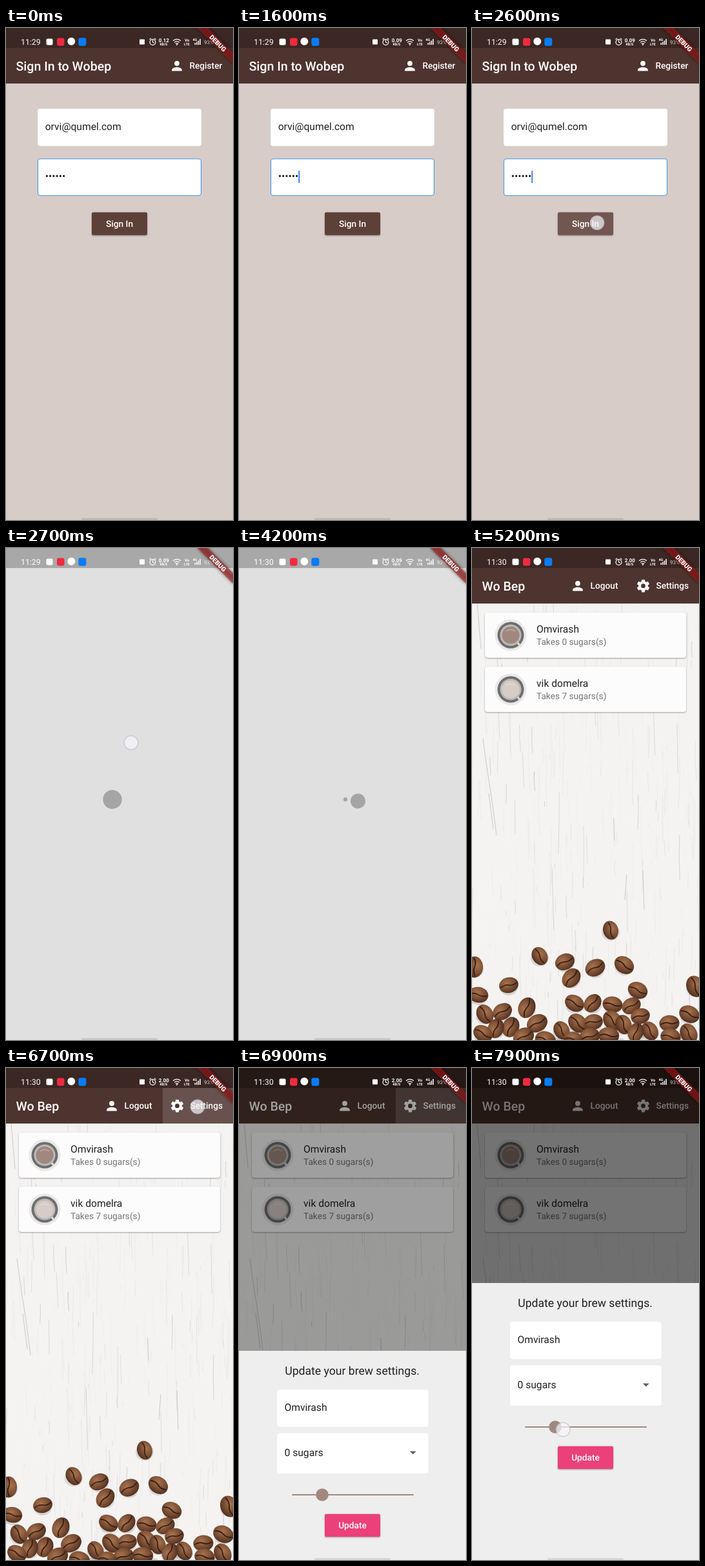
Write an HTML page that moves like this. It is 352 by 762 pixels and loops after 8000 ms.

```html
<!DOCTYPE html>
<html lang="en">
<head>
<meta charset="utf-8">
<title>Brew settings</title>
<style>
  html, body { margin: 0; width: 100%; height: 100%; overflow: hidden; background: #d7ccc8; }
  svg { display: block; width: 100%; height: 100%; }
  text {
    font-family: Roboto, "Open Sans", sans-serif; font-size: 15.65px; fill: #212121;
    text-rendering: geometricPrecision;
  }
  .title { font-size: 19.56px; font-weight: 500; fill: #fff; }
  .label { font-size: 13.7px; font-weight: 500; fill: #fff; }
  .sub { font-size: 13.7px; fill: #757575; }
  .mid { text-anchor: middle; }
  .raised { filter: drop-shadow(0 1px 1px rgba(0, 0, 0, .35)); }
  #status text { fill: #fff; }
</style>
</head>
<body>
<svg id="stage" viewBox="0 0 352 762" preserveAspectRatio="none"></svg>
<script>
const LOOP = 8000;
const LOADING = 2660, HOME = 4300, SHEET = 6801;
const SHEET_TOP = 333, HEIGHT = 762;

const rect = (x, y, w, h, fill, r = 0, extra = '') =>
  `<rect x="${x}" y="${y}" width="${w}" height="${h}" rx="${r}" fill="${fill}" ${extra}/>`;
const disc = (x, y, r, fill, extra = '') =>
  `<circle cx="${x}" cy="${y}" r="${r}" fill="${fill}" ${extra}/>`;
const text = (x, y, s, cls = '', extra = '') =>
  `<text x="${x}" y="${y}" class="${cls}" ${extra}>${s}</text>`;
const group = (id, ...parts) => `<g id="${id}">${parts.join('')}</g>`;
const tiny = (x, y, s, size, weight = 700, extra = '') =>
  text(x, y, s, '', `style="font-size:${size}px;font-weight:${weight}" ${extra}`);

function random(seed) {
  return () => (seed = (seed * 16807) % 2147483647) / 2147483647;
}

// CSS-style cubic curve, solved by bisection
function bezier(x1, y1, x2, y2) {
  const at = (a, b, s) => 3 * a * s * (1 - s) ** 2 + 3 * b * s * s * (1 - s) + s ** 3;
  return x => {
    if (x <= 0) return 0;
    if (x >= 1) return 1;
    let lo = 0, hi = 1;
    for (let i = 0; i < 24; i++) {
      const m = (lo + hi) / 2;
      if (at(x1, x2, m) < x) lo = m; else hi = m;
    }
    return at(y1, y2, lo);
  };
}
const easeInOut = bezier(.42, 0, .58, 1);
const ease = bezier(.25, .1, .25, 1);
const decelerate = bezier(0, 0, .2, 1);

const bar = title => rect(0, 0, 352, 86, '#4e342e') + text(15.5, 66, title, 'title');
const person = x =>
  `<path transform="translate(${x - 11.75} 47) scale(.98)" fill="#fff"
    d="M12 12a4 4 0 1 0 0-8 4 4 0 0 0 0 8zm0 2c-2.7 0-8 1.3-8 4v2h16v-2c0-2.7-5.3-4-8-4z"/>`;

function gear(x, y) {
  const teeth = [0, 60, 120].map(a =>
    rect(-2.6, -9.8, 5.2, 19.6, '#fff', 1, `transform="rotate(${a})"`)).join('');
  return `<g transform="translate(${x} ${y})">${teeth}
    <circle r="5.4" fill="none" stroke="#fff" stroke-width="4"/>${disc(0, 0, 3.4, '#4e342e')}</g>`;
}

const button = (y, fill, label) =>
  rect(133, y, 86, 35.2, fill, 2, 'class="raised"') + text(176, y + 22.2, label, 'label mid');

function signIn() {
  return group('signIn',
    rect(0, 0, 352, HEIGHT, '#d7ccc8'),
    bar('Sign In to Wobep'), person(265), text(284.4, 63.4, 'Register', 'label'),
    rect(49, 125, 254, 57.7, '#fff', 4), text(60.7, 158, 'orvi@qumel.com'),
    rect(49.5, 202.8, 253, 56.7, '#fff', 4, 'stroke="#4a9ae0" stroke-width="1.1"'),
    text(60.7, 235, '••••••'),
    rect(92.2, 221, 2, 19, '#4285f4', 0, 'id="cursor"'),
    button(285.5, '#5d4037', 'Sign In'),
    rect(133, 285.5, 86, 35.2, '#fff', 2, 'id="press" opacity="0"'));
}

function wood() {
  const rnd = random(4711);
  let out = rect(0, 86, 352, 676, '#f4f3f2');
  for (let i = 0; i < 600; i++) {
    const x = rnd() * 352, y = 70 + rnd() * 660, len = 8 + rnd() ** 2 * 90;
    const lean = (rnd() - .4) * len * .08, alpha = .04 + rnd() ** 4 * .2;
    const color = i % 3 ? '#77716d' : '#fff';
    out += `<path d="M${x.toFixed(1)} ${y.toFixed(1)}q${(rnd() * 3 - 1.5).toFixed(1)} ${(len / 2).toFixed(1)} ${lean.toFixed(1)} ${len.toFixed(1)}"
      stroke="${color}" stroke-width="${(.5 + rnd()).toFixed(1)}" opacity="${alpha.toFixed(2)}"/>`;
  }
  const cracks = 'M17 295q5 40 10 70t11 80M26 380l7 55M240 505l-3 40M265 500l2 60M8 86l6 70';
  return `<g fill="none">${out}<path d="${cracks}" stroke="#6d6865" opacity=".3"/></g>`;
}

// x, y, tilt
const BEANS = [
  215, 592, 75, 105, 632, 60, 4, 649, 90, 144, 641, -25, 154, 666, -50, 191, 650, -30,
  236, 646, 35, 57, 677, -15, 10, 692, 10, 257, 685, 25, 346, 679, 70, 159, 705, 30,
  187, 705, -50, 218, 707, 10, 247, 709, -30, 20, 722, 60, 47, 718, -30, 85, 712, -70,
  101, 736, -30, 60, 742, -65, 37, 744, -70, 218, 732, 50, 235, 738, 70, 261, 725, -15,
  164, 736, 45, 188, 734, -10, 139, 747, 60, 337, 722, 25, 276, 748, 60, 306, 736, -5,
  254, 750, -70, 17, 752, 30, 80, 757, -30, 212, 755, 5, 182, 757, -20, 308, 757, 10,
  336, 752, 60, 114, 762, 20, 157, 761, 10
];

function beans() {
  const rnd = random(99);
  let out = '';
  for (let i = 0; i < BEANS.length; i += 3) {
    const [x, y, tilt] = BEANS.slice(i, i + 3);
    const size = (.93 + rnd() * .14).toFixed(2);
    out += `<ellipse cx="${x}" cy="${y + 3}" rx="14" ry="13" fill="#3b2a20" opacity=".15"/>
      <use href="#bean" transform="translate(${x} ${y}) rotate(${tilt}) scale(${size})"/>`;
  }
  return out;
}

function card(y, name, sugars, tone) {
  const cy = y + 35;
  return rect(20, y, 312, 70, '#fcfcfc', 4, 'class="raised"')
    + disc(60, cy, 24.5, '#ebe8e7') + disc(60, cy, 20.5, '#6c6f70')
    + `<path d="M71 ${cy + 12}l3 4" stroke="#e0dddc" stroke-width="3" stroke-linecap="round"/>`
    + disc(60, cy, 16.5, '#bdbbba') + disc(60, cy, 13.6, tone)
    + `<path d="M53 ${cy - 6}q7 -5 14 0" stroke="#fff" opacity=".5" fill="none"/>`
    + text(100, y + 31.2, name) + text(100, y + 50.2, `Takes ${sugars} sugars(s)`, 'sub');
}

function home() {
  return group('home',
    wood(), beans(), bar('Wo Bep'),
    rect(243, 31, 109, 55, '#fff', 0, 'id="ink" opacity="0"'),
    person(164), text(183.6, 63.4, 'Logout', 'label'),
    gear(265.5, 58.7), text(285.4, 63.4, 'Settings', 'label'),
    card(100, 'Omvirash', 0, '#a1887f'), card(184, 'vik domelra', 7, '#d7ccc8'));
}

function loading() {
  return group('loading',
    rect(0, 0, 352, HEIGHT, '#e0e0e0'),
    `<g id="spin">${disc(-9.8, -9.8, 0, '#a5a5a5', 'id="dotA"')}${disc(-9.8, 9.8, 0, '#a5a5a5', 'id="dotB"')}</g>`);
}

function sheet() {
  return group('sheet',
    rect(0, 0, 352, 430, '#eee'),
    text(175.6, 37, 'Update your brew settings.', 'mid', 'style="font-size:17.6px"'),
    rect(59, 60, 234.5, 57.8, '#fff', 4), text(70.5, 93.4, 'Omvirash'),
    rect(59, 127.5, 234.5, 62.5, '#fff', 4), text(70.5, 163.2, '0 sugars'),
    '<path d="M264.8 155.6h10l-5 5z" fill="#616161"/>',
    rect(82, 222, 189, 2, '#a1887f', 1), disc(129, 223, 9.8, '#a1887f'),
    button(252.7, '#ec407a', 'Update'));
}

function status() {
  const line = 'fill="none" stroke="#fff" stroke-width="1.2" stroke-linecap="round"';
  const bars = [3, 4.5, 6.5, 9].map((h, i) => rect(292.5 + i * 2.6, 26 - h, 1.5, h, '#fff')).join('');
  return group('status',
    text(23, 25.8, '', '', 'id="clock" style="font-size:12.3px"'),
    rect(62.5, 16.5, 10, 10, '#fff', 2), rect(79, 15.5, 11.5, 12, '#ee2b40', 3),
    disc(101.3, 20.8, 6, '#fff'), rect(112.3, 15.3, 12, 12.4, '#0a7cf5', 3),
    rect(207, 17.5, 8, 8, '#fff', 1),
    `<path d="M227.5 19v3l2 1M223 17.5l1.6-1.4M232 17.5l-1.6-1.4" ${line}/>
     <circle cx="227.5" cy="22" r="4.4" ${line}/>
     <path d="M259.4 19.5q5.6-4.4 11.2 0M261.4 22q3.6-2.8 7.2 0M263.3 24.3q1.7-1.3 3.4 0" ${line}/>`,
    disc(265, 26, 1, '#fff'),
    tiny(236.8, 21.8, '', 8, 700, 'id="speed"'), tiny(238.4, 27.4, 'KB/S', 5.3),
    tiny(277, 20.8, 'Vo', 6), tiny(276, 26.8, 'LTE', 5.4),
    tiny(289.5, 20, '4G', 5.4), bars,
    `<g opacity=".8">${tiny(307, 24.6, '93%', 8, 400)}</g>`,
    '<path d="M327 16l-4 6h3l-1 5 5-7h-3z" fill="#fff" opacity=".8"/>');
}

const ribbon = (fill, extra) => rect(-39.1, 27.4, 78.2, 11.7, fill, 0, extra);
const banner = `<g transform="translate(352 0) rotate(45)">
  ${ribbon('#000', 'opacity=".5" style="filter:blur(2.5px)"')}
  ${ribbon('#b71c1c', 'opacity=".55"')}
  ${text(0, 36.8, 'DEBUG', 'mid', 'style="font-size:9.97px;font-weight:900;fill:#fff"')}</g>`;

document.getElementById('stage').innerHTML = `
  <defs>
    <radialGradient id="roast" cx=".42" cy=".35" r=".75">
      <stop offset="0" stop-color="#a87350"/><stop offset=".5" stop-color="#7d4f34"/><stop offset="1" stop-color="#44281a"/>
    </radialGradient>
    <g id="bean">
      <ellipse rx="15.8" ry="12.6" fill="url(#roast)"/>
      <path d="M-14 1Q-6 -3 0 0T14 -1" fill="none" stroke="#2f1a10" stroke-width="1.6"/>
    </g>
  </defs>`
  + signIn() + home() + loading()
  + rect(0, 0, 352, 31, '#000', 0, 'opacity=".25"')
  + rect(0, 0, 352, HEIGHT, '#000', 0, 'id="scrim"')
  + sheet() + status() + banner
  + rect(117, 759, 118, 6, '#000', 2, 'opacity=".1"')
  + disc(0, 0, 10.8, '#f6f6fa', 'id="touch" fill-opacity=".7" stroke="#b9bbd0" stroke-opacity=".7" stroke-width="1.3"');

const el = {};
document.querySelectorAll('#stage [id]').forEach(n => el[n.id] = n);
const set = (id, name, value) => el[id].setAttribute(name, value);
const show = (id, on) => set(id, 'display', on ? 'inline' : 'none');
const within = (t, a, b) => t >= a && t < b;
const ramp = (t, a, b) => Math.min(1, Math.max(0, (t - a) / (b - a)));

// start, end, x, y
const TOUCHES = [[2400, 2790, 194, 301.6], [6400, 6790, 297, 60], [7700, 8000, 141.3, 560]];

function spin(t) {
  const phase = ((t - LOADING) / 2000) % 1;
  const scale = Math.abs(2 * easeInOut(phase) - 1);
  set('spin', 'transform', `translate(176 381) rotate(${phase * 360})`);
  set('dotA', 'r', 14.7 * (1 - scale));
  set('dotB', 'r', 14.7 * scale);
}

function draw(t) {
  const waiting = within(t, LOADING, HOME);
  show('signIn', t < LOADING);
  show('loading', waiting);
  show('home', t >= HOME);
  if (waiting) spin(t);

  show('cursor', within(t, 500, 1050) || within(t, 1500, 2000) || t >= 2500);
  set('press', 'opacity', .12 * ramp(t, 2400, 2550));
  set('ink', 'opacity', .15 * ramp(t, 6400, 6600) * (1 - ramp(t, 6900, 7050)));

  const p = (t - SHEET) / 250;
  set('scrim', 'opacity', .54 * ease(p));
  show('sheet', p > 0);
  set('sheet', 'transform', `translate(0 ${HEIGHT - (HEIGHT - SHEET_TOP) * decelerate(p)})`);

  el.clock.textContent = t < 3700 ? '11:29' : '11:30';
  el.speed.textContent = t < 1100 ? '0.12' : t < 5000 ? '0.09' : '2.00';

  const touch = TOUCHES.find(([a, b]) => within(t, a, b));
  show('touch', touch);
  if (touch) set('touch', 'transform', `translate(${touch[2]} ${touch[3]})`);
}

const start = performance.now();
function tick() {
  draw((performance.now() - start) % LOOP);
  requestAnimationFrame(tick);
}
tick();
</script>
</body>
</html>
```
